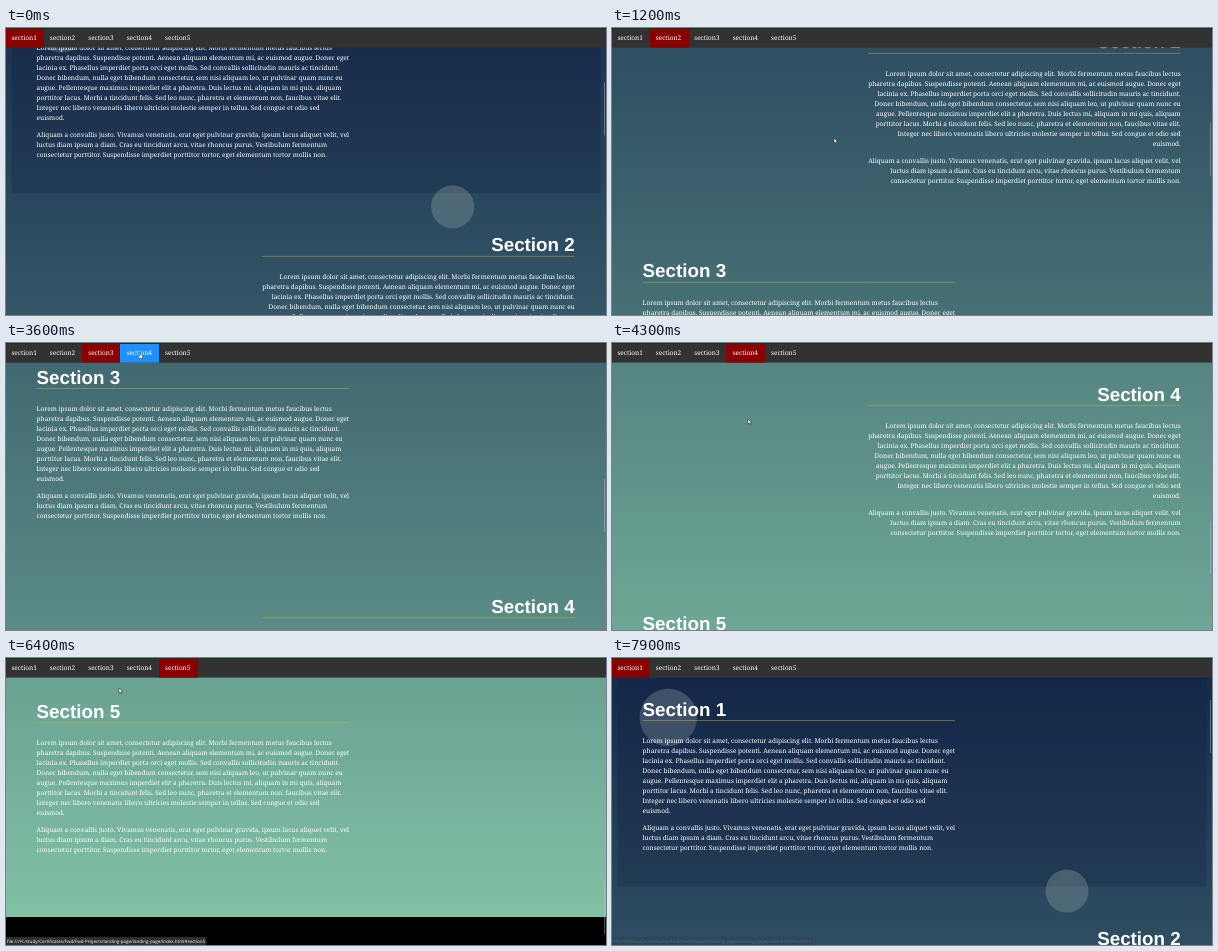
Write an HTML page that moves like this. It is 600x287 px and loops after 8 s.

```html
<!DOCTYPE html>
<html lang="en">
<head>
<meta charset="utf-8">
<title>Landing page</title>
<style>
  html, body { margin: 0; width: 100%; height: 100%; overflow: hidden; background: #000; }
  svg { display: block; width: 100vw; height: 100vh; }
  text { fill: #fff; text-rendering: geometricPrecision; }
  .copy, .link { font: 6.44px "Noto Serif", serif; }
  .title { font: bold 18.8px "Liberation Sans", Arial, sans-serif; }
  .status { font: 4.55px "Open Sans", sans-serif; }
</style>
</head>
<body>
<svg id="stage" viewBox="0 0 600 287">
  <defs>
    <linearGradient id="sky" x1="0" y1="0" x2="0" y2="1">
      <stop offset="0" stop-color="rgb(0,13,60)"/>
      <stop offset="1" stop-color="rgb(136,203,171)"/>
    </linearGradient>
    <linearGradient id="glass" x1="0" y1="0" x2="0" y2="1">
      <stop offset="0" stop-color="#eff8e8" stop-opacity=".2"/>
      <stop offset="1" stop-color="#eff8e8" stop-opacity=".17"/>
    </linearGradient>
  </defs>
</svg>
<script>
const LOOP = 8000, PITCH = 229, EM = 6.27, SECTIONS = 5;
const COPY = [
  "Lorem ipsum dolor sit amet, consectetur adipiscing elit. Morbi fermentum metus faucibus lectus",
  "pharetra dapibus. Suspendisse potenti. Aenean aliquam elementum mi, ac euismod augue. Donec eget",
  "lacinia ex. Phasellus imperdiet porta orci eget mollis. Sed convallis sollicitudin mauris ac tincidunt.",
  "Donec bibendum, nulla eget bibendum consectetur, sem nisi aliquam leo, ut pulvinar quam nunc eu",
  "augue. Pellentesque maximus imperdiet elit a pharetra. Duis lectus mi, aliquam in mi quis, aliquam",
  "porttitor lacus. Morbi a tincidunt felis. Sed leo nunc, pharetra et elementum non, faucibus vitae elit.",
  "Integer nec libero venenatis libero ultricies molestie semper in tellus. Sed congue et odio sed",
  "euismod.",
  "Aliquam a convallis justo. Vivamus venenatis, erat eget pulvinar gravida, ipsum lacus aliquet velit, vel",
  "luctus diam ipsum a diam. Cras eu tincidunt arcu, vitae rhoncus purus. Vestibulum fermentum",
  "consectetur porttitor. Suspendisse imperdiet porttitor tortor, eget elementum tortor mollis non."
];

const stage = document.getElementById("stage");

function add(parent, tag, attrs, content) {
  const node = document.createElementNS("http://www.w3.org/2000/svg", tag);
  for (const key in attrs) node.setAttribute(key, attrs[key]);
  if (content) node.textContent = content;
  parent.appendChild(node);
  return node;
}
const rect = (parent, x, y, width, height, fill) =>
  add(parent, "rect", { x, y, width, height, fill });
const move = (node, x, y) => node.setAttribute("transform", `translate(${x} ${y})`);
const show = (node, opacity) => node.setAttribute("opacity", opacity);

// Page content, with y = 0 at the top of section 1
const page = add(stage, "g");
rect(page, 0, -212, 600, 1462, "url(#sky)");
rect(page, 5.5, 0, 589, 228.5, "rgba(12,24,58,.25)");
const bigDisc = add(page, "circle", { r: 28.7, fill: "url(#glass)" });
const smallDisc = add(page, "circle", { r: 21.5, fill: "url(#glass)" });
rect(page, 0, 1173, 600, 300, "#000");

for (let i = 0; i < SECTIONS; i++) {
  const right = i % 2 === 1;
  const x = right ? 568.7 : 30.6;
  const anchor = right ? "end" : "start";
  const section = add(page, "g", { transform: `translate(0 ${i * PITCH})`, "text-anchor": anchor });
  add(section, "text", { x, y: 57.6, class: "title" }, `Section ${i + 1}`);
  rect(section, right ? 256 : 30.6, 62, 312.6, 1, "rgba(196,190,30,.45)");
  COPY.forEach((line, n) => {
    const y = 85.2 + n * 10.03 + (n > 7 ? EM : 0);
    add(section, "text", { x, y, class: "copy" }, line);
  });
}

// Fixed parts
const thumb = rect(stage, 598, 0, 1, 53, "rgba(190,204,208,.4)");
rect(stage, 0, 0, 600, 19.6, "#323232");
rect(stage, 0, 0, 600, 1, "#0c3a1c");
const cells = [];
for (let i = 0; i < SECTIONS; i++) {
  const x = -0.8 + i * 38.4;
  cells.push(rect(stage, Math.round(x), 1, 39, 18.6, "none"));
  add(stage, "text", { x: x + EM, y: 12.4, class: "link" }, `section${i + 1}`);
}

const status = add(stage, "g");
rect(status, 0, 279, 200.5, 8, "#2e2e2e");
const address = add(status, "text", { x: 1, y: 284.8, class: "status" });

const pointer = add(stage, "g");
const outline = { fill: "#fff", stroke: "#222", "stroke-width": .5, "stroke-linejoin": "round" };
const arrow = add(pointer, "path", { d: "M0 0V5L1.2 4L2 5.8L2.9 5.4L2.1 3.7H3.6Z", ...outline });
const hand = add(pointer, "path",
  { d: "M-.6 -2.5H.4V-.4L2.6 .2V2.2L2 3.6H-.6L-2 1.2L-1.4 .6L-.6 1.2Z", ...outline });

const clamp = v => Math.min(1, Math.max(0, v));
const smooth = v => { v = clamp(v); return v * v * (3 - 2 * v); };

// Wheel scrolling first, then three clicks on the menu
const glides = [
  { start: 3660, end: 4260, to: 3 * PITCH },
  { start: 4823, end: 5523, to: 914 },
  { start: 7000, end: 7750, to: 0 }
];
function scrollAt(t) {
  let y = Math.min(475, 63 + t * 203 / 1200);
  for (const { start, end, to } of glides) y += (to - y) * smooth((t - start) / (end - start));
  return y;
}

const pointerPath = [
  [250, 248, 138], [1200, 222, 110], [2400, 126, 73], [2850, 126, 62], [3350, 134, 12],
  [3800, 134, 12], [4300, 136, 76], [4750, 177, 12], [5950, 177, 12], [6400, 113, 30],
  [6850, 18, 12], [7600, 18, 12], [7850, 8, -12]
];
function pointerAt(t) {
  for (let i = 1; i < pointerPath.length; i++) {
    const [t0, x0, y0] = pointerPath[i - 1], [t1, x1, y1] = pointerPath[i];
    if (t <= t1) {
      const k = smooth((t - t0) / (t1 - t0));
      return [x0 + (x1 - x0) * k, y0 + (y1 - y0) * k];
    }
  }
  return pointerPath[pointerPath.length - 1].slice(1);
}

function statusAt(t) {
  if (t < 5250) return [0, 5];
  if (t < 6900) return [clamp((t - 5250) / 150) * (1 - clamp((t - 6550) / 200)), 5];
  return [clamp((t - 7050) / 150) * (1 - clamp((t - 7700) / 240)), 1];
}

function orbit(node, cx, cy, degrees) {
  const a = degrees * Math.PI / 180;
  move(node, cx + EM * Math.cos(a), cy + EM * Math.sin(a));
}

function draw(t) {
  const y = scrollAt(t);
  const [px, py] = pointerAt(t);
  move(page, 0, -y);
  move(thumb, 0, 42 + y * .198);
  orbit(bigDisc, 59.5, 54.2, 130 + t * .09);
  orbit(smallDisc, 451.9, 238.6, 147.8 - t * .072);

  const active = Math.round(y / PITCH);
  const hover = py > 1 && py < 19.6 ? Math.floor((px + .8) / 38.4) : -1;
  cells.forEach((cell, i) =>
    cell.setAttribute("fill", i === active ? "#8b0000" : i === hover ? "#1e90ff" : "none"));

  const [opacity, section] = statusAt(t);
  show(status, opacity);
  address.textContent =
    `file:///H:/study/Certificates/Fwd/Fwd-Projects/landing-page/landing-page/index.html#section${section}`;

  move(pointer, px, py);
  show(pointer, t < 250 ? 0 : 1);
  show(arrow, hover < 0 ? 1 : 0);
  show(hand, hover < 0 ? 0 : 1);
}

const begin = performance.now();
function tick() {
  draw((performance.now() - begin) % LOOP);
  requestAnimationFrame(tick);
}
tick();
</script>
</body>
</html>
```
